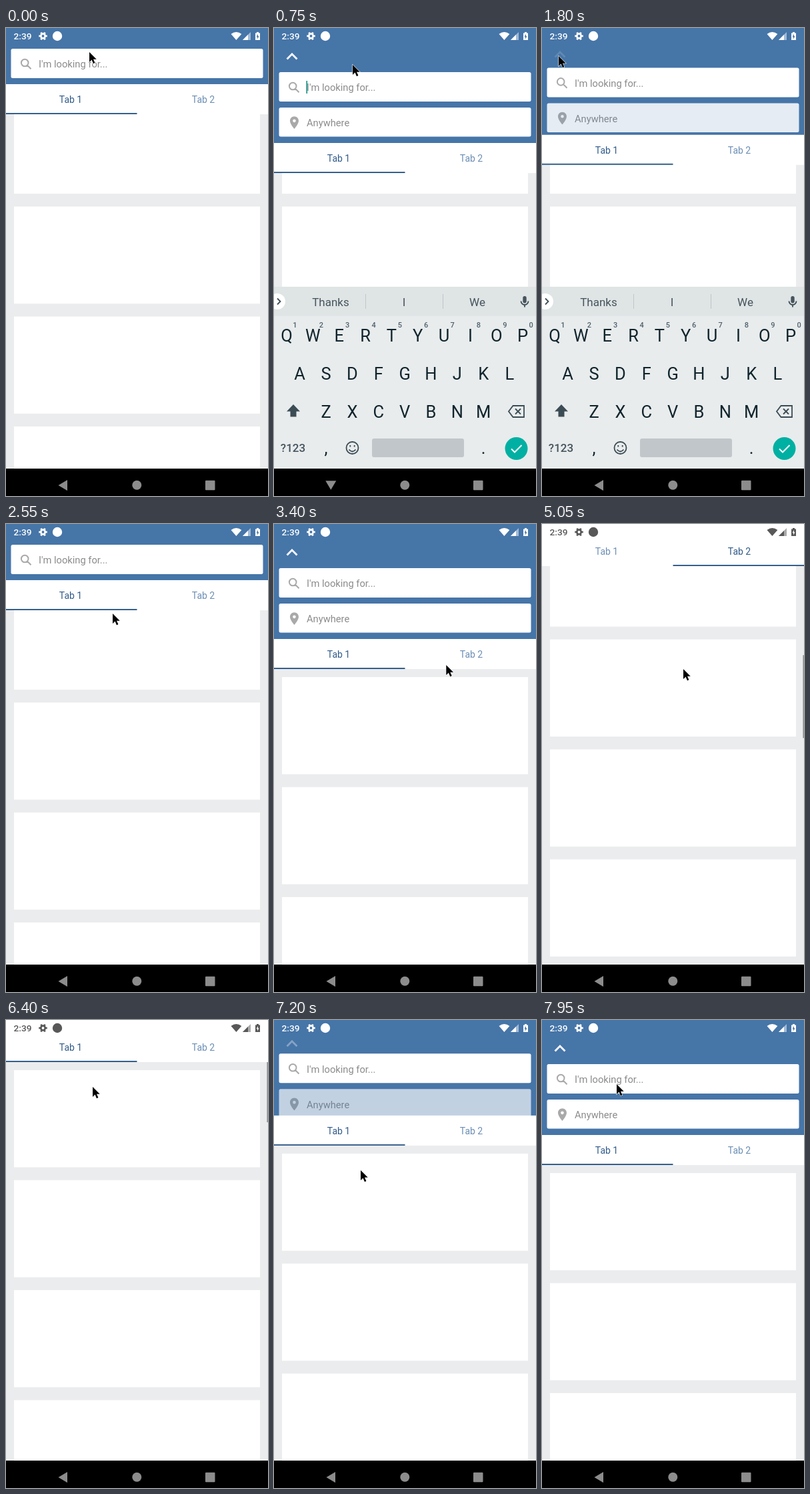
An HTML page that plays this animation: 393x700 px, repeating every 8000 ms.

```html
<!DOCTYPE html>
<html lang="en">
<head>
<meta charset="utf-8">
<title>Collapsing search header</title>
<style>
  html, body { margin: 0; width: 100%; height: 100%; overflow: hidden; background: #fff; }
  svg { display: block; width: 393px; height: 700px; font-family: Roboto, sans-serif; }
  .hint { font-size: 14.7px; fill: #8b8b8b; }
  .tab { font-size: 14px; text-anchor: middle; }
  .key { font-size: 25.5px; text-anchor: middle; fill: #11242c; }
  .digit { font-size: 11px; font-weight: 500; text-anchor: middle; fill: #51606a; }
  .word { font-size: 17px; text-anchor: middle; fill: #46545c; }
  .line { fill: none; stroke: #3c4c54; stroke-width: 1.8; }
</style>
</head>
<body>
<svg viewBox="0 0 393 700">
  <rect width="393" height="700" fill="#ebecee"/>
  <g id="pages">
    <g id="list1"></g>
    <g transform="translate(393)"><g id="list2"></g></g>
  </g>
  <rect id="scrollbar" x="391.400" width="1.600" height="124" fill="#8f9091"/>

  <g id="keyboard">
    <rect y="387" width="393" height="273" fill="#e8eced"/>
    <rect y="387" width="393" height="43.500" fill="#dfe4e5"/>
    <circle cx="5" cy="409" r="12" fill="#fff"/>
    <path class="line" d="M5 404.500l4.500 4.500-4.500 4.500"/>
    <path d="M137.500 398v22M253.500 398v22" stroke="#c0c7ca"/>
    <text class="word" x="85" y="416">Thanks</text>
    <text class="word" x="195" y="416">I</text>
    <text class="word" x="305" y="416">We</text>
    <rect x="373.300" y="401" width="5.400" height="10.500" rx="2.700" fill="#46545c"/>
    <path class="line" d="M370.500 408.500a5.500 5.500 0 0 0 11 0M376 414v3.500"/>
    <g id="keys"></g>
    <path d="M29 563l10 10.500h-5.500v8h-9v-8h-5.500z" fill="#3c4c54"/>
    <path class="line" d="M358.500 565h16.500v17h-16.500l-6.500-8.500zM362 569.500l8 8m0-8l-8 8"/>
    <text class="word" x="28.500" y="634" font-weight="500">?123</text>
    <text class="key" x="78" y="637">,</text>
    <circle class="line" cx="117.500" cy="628" r="9"/>
    <path class="line" d="M112.500 630.500q5 6 10 0M114.300 624v2.500M120.700 624v2.500"/>
    <rect x="147" y="614" width="138" height="28" rx="3" fill="#c1c6ca"/>
    <text class="key" x="314" y="637">.</text>
    <circle cx="363.500" cy="629" r="17" fill="#00b0a2"/>
    <path d="M356 629.500l5 5 10.500-10.500" fill="none" stroke="#fff" stroke-width="2"/>
  </g>

  <g id="tabs">
    <rect width="393" height="45" fill="#fff"/>
    <text id="tab1" class="tab" x="97" y="28">Tab 1</text>
    <text id="tab2" class="tab" x="296" y="28">Tab 2</text>
    <rect id="indicator" y="43" width="196.500" height="2" fill="#35608c"/>
  </g>
  <rect id="headerBase" width="393" fill="#fff"/>
  <g id="header">
    <rect id="blue" width="393" fill="#4675a8"/>
    <g id="place">
      <rect x="7.500" width="378" height="43.500" rx="2.500" fill="#fff"/>
      <path transform="translate(19.300 11.500) scale(.93)" fill="#a9a9a9" d="M12 2C8.130 2 5 5.130 5 9c0 5.250 7 13 7 13s7-7.750 7-13c0-3.870-3.130-7-7-7zm0 9.500a2.500 2.500 0 0 1 0-5 2.500 2.500 0 0 1 0 5z"/>
      <text class="hint" x="49" y="28.300">Anywhere</text>
    </g>
    <g id="search">
      <rect x="7.500" width="378" height="44" rx="2.500" fill="#fff"/>
      <path d="M32 24.800l5.500 5.500M33.500 21a5.300 5.300 0 1 0-10.600 0a5.300 5.300 0 1 0 10.600 0" fill="none" stroke="#a9a9a9" stroke-width="2"/>
      <text class="hint" x="49" y="28.300">I'm looking for...</text>
      <rect id="caret" x="48.500" y="13" width="1.500" height="19" fill="#00897b"/>
    </g>
    <path id="chevron" d="M19.500 46.500L27 39l7.500 7.500" fill="none" stroke="#fff" stroke-width="2.800"/>
  </g>

  <g id="status">
    <text x="11.500" y="17" font-size="13.700" font-weight="500">2:39</text>
    <g transform="translate(55.500 12)" fill="none" stroke="currentColor">
      <circle r="3.300" stroke-width="2.800"/>
      <circle r="5.200" stroke-width="2.200" pathLength="12" stroke-dasharray="1" stroke-dashoffset=".5"/>
    </g>
    <circle cx="77" cy="12" r="7.200"/>
    <path d="M337.500 9q7.900-6 15.800 0l-7.900 9z"/>
    <path d="M367 6v12h-12z" opacity=".5"/>
    <path d="M363 10v8h-8z"/>
    <path fill-rule="evenodd" d="M374 7.500h2v-1.500h3v1.500h2v10.500h-7zM378 9l-2.500 4.200h1.500v3.300l2.500-4.300h-1.500z"/>
  </g>

  <rect y="659" width="393" height="41"/>
  <g fill="#8c8c8c">
    <path id="back" d="M78.500 684l13.500-8v16z"/>
    <circle cx="196.300" cy="683.700" r="7"/>
    <rect x="299" y="676.800" width="14.500" height="14.500" rx="1"/>
  </g>
  <g id="cursor">
    <path id="arrow" transform="scale(.88)" d="M0 0v17l4-3.800 2.800 6.300 2.800-1.200-2.800-6.100h5.400z" stroke="#fff" stroke-width="1.200" paint-order="stroke"/>
  </g>
</svg>
<script>
const LOOP = 8000, WIDTH = 393, FULL = 172, COMPACT = 88, HIDDEN = 154;
const PITCH = 164.5, CARDS = 20;
const START_SCROLL = 126.5, PAUSE_SCROLL = 87.5, SWIPE = 195.5, FLING = 849;
const el = {};
document.querySelectorAll('[id]').forEach(node => el[node.id] = node);

const clamp = v => Math.min(1, Math.max(0, v));
const mix = (a, b, k) => a + (b - a) * k;
const progress = (t, start, length) => clamp((t - start) / length);
const ramp = (t, start, length) => (1 - Math.cos(Math.PI * progress(t, start, length))) / 2;
const within = (t, a, b) => t >= a && t < b;
const set = (node, attrs) => { for (const name in attrs) node.setAttribute(name, attrs[name]); };
const move = (node, x, y) => set(node, { transform: `translate(${x} ${y})` });

function build() {
  let cards = '';
  for (let i = 0; i < CARDS; i++)
    cards += `<rect x="12" y="${229 + i * PITCH}" width="369" height="145.300" fill="#fff"/>`;
  el.list1.innerHTML = el.list2.innerHTML = cards;

  let keys = '';
  ['QWERTYUIOP', 'ASDFGHJKL', 'ZXCVBNM'].forEach((row, r) =>
    [...row].forEach((letter, i) => {
      const x = 19 + (i + r / 2 + (r === 2) / 2) * 39.35;
      keys += `<text class="key" x="${x}" y="${469 + r * 57}">${letter}</text>`;
      if (!r) keys += `<text class="digit" x="${x + 12.5}" y="447.500">${(i + 1) % 10}</text>`;
    }));
  el.keys.innerHTML = keys;
}

const firstScroll = t => t < 4700
  ? START_SCROLL - (START_SCROLL - PAUSE_SCROLL) * ramp(t, 2580, 220) - PAUSE_SCROLL * ramp(t, 2920, 220)
  : HIDDEN * (1 - ramp(t, 6830, 520));

const secondScroll = t =>
  SWIPE * ramp(t, 4450, 200) + FLING * (1 - (1 - progress(t, 4655, 445)) ** 3);

// Eases through the pointer's stops; drags follow the scroll distances.
function pointer(t) {
  let x = 125, y = 36;
  const go = (start, length, toX, toY) => {
    const k = ramp(t, start, length);
    x = mix(x, toX, k);
    y = mix(y, toY, k);
  };
  go(20, 250, 118, 55);
  go(1000, 500, 25, 42);
  go(1900, 500, 160, 134);
  go(2580, 220, 160, 134 + START_SCROLL - PAUSE_SCROLL);
  go(2920, 220, 160, 134 + START_SCROLL);
  go(3148, 400, 300, 190);
  go(4200, 240, 212, 217 + SWIPE);
  go(4450, 200, 212, 217);
  go(5400, 500, 88, 36);
  go(6180, 200, 130, 100);
  go(6830, 520, 130, 100 + HIDDEN);
  go(7350, 250, 295, 272);
  go(7640, 150, 34, 20);
  go(7790, 150, 112, 96);
  return [x, y];
}

function drawHeader(t, d) {
  const bottom = FULL - d;
  const open = 1 - clamp(d / COMPACT);
  const lift = Math.max(0, d - COMPACT);
  const fieldShift = Math.min(35, d * .54) + lift;
  const pressed = within(t, 1680, 1900) ? .2 : 1;

  move(el.tabs, 0, bottom);
  set(el.headerBase, { height: bottom });
  set(el.blue, { height: bottom });
  set(el.header, { opacity: 1 - lift / (HIDDEN - COMPACT) });
  move(el.search, 0, 66 - fieldShift);
  move(el.place, 0, 119 - fieldShift);
  set(el.place, { opacity: open });
  move(el.chevron, 0, -d * .25);
  set(el.chevron, { opacity: clamp(open * 2 - 1) * pressed });
  set(el.caret, { opacity: within(t, 700, 1700) && (t - 700) % 1000 < 500 ? 1 : 0 });
}

function drawTabs(page) {
  const tint = k => `rgb(${mix(107, 48, k)},${mix(142, 90, k)},${mix(180, 138, k)})`;
  set(el.tab1, { fill: tint(1 - page) });
  set(el.tab2, { fill: tint(page) });
  set(el.indicator, { x: page * WIDTH / 2 });
  move(el.pages, -page * WIDTH, 0);
}

function draw(t) {
  const scroll1 = firstScroll(t), scroll2 = secondScroll(t);
  const scroll = within(t, 3780, 6150) ? scroll2 : scroll1;
  const toggled = COMPACT * (1 - ramp(t, 280, 300) + ramp(t, 1728, 300));
  const barShown = (from, until) => ramp(t, from, 50) - ramp(t, until, 250);

  move(el.list1, 0, -scroll1);
  move(el.list2, 0, -scroll2);
  set(el.scrollbar, {
    y: scroll * .188,
    opacity: barShown(2580, 3100) + barShown(4450, 5400) + barShown(6150, 6410) + barShown(6830, 7350)
  });
  drawHeader(t, t < 2900 ? toggled : Math.min(scroll, HIDDEN));
  drawTabs(ramp(t, 3770, 190) - ramp(t, 6130, 210));

  const ink = within(t, 4800, 7000) ? '#585858' : '#fff';
  set(el.status, { fill: ink, color: ink });
  move(el.keyboard, 0, 273 * (1 - ramp(t, 380, 260) + ramp(t, 1840, 250)));
  set(el.back, { transform: `rotate(${within(t, 430, 1780) ? -90 : 0} 85.3 684)` });
  move(el.cursor, ...pointer(t));
}

function frame(now) {
  draw(now % LOOP);
  requestAnimationFrame(frame);
}

build();
draw(0);
requestAnimationFrame(frame);
</script>
</body>
</html>
```
